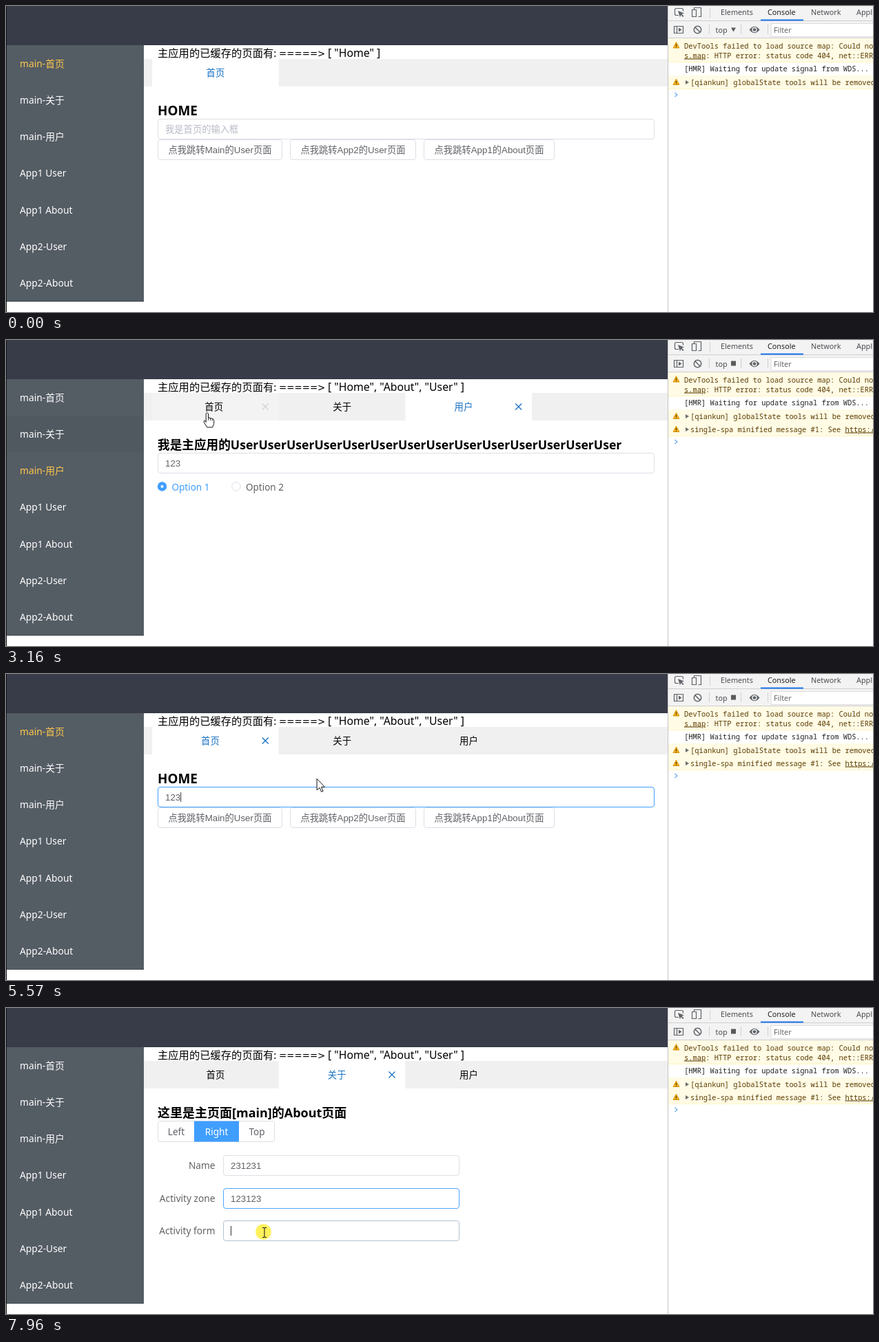
An HTML page that plays this animation: 1258 by 445 pixels, repeating every 8 s.

```html
<!DOCTYPE html>
<html lang="zh-CN">
<head>
<meta charset="utf-8">
<style>
html, body { margin: 0; width: 100%; height: 100%; overflow: hidden; background: #fff; }
svg { display: block; width: 100%; height: 100%; font-family: "Noto Sans", "Noto Sans CJK SC", "Noto Sans CJK", sans-serif; }
.arial { font-family: "Liberation Sans", "Noto Sans CJK SC", "Noto Sans CJK", sans-serif; }
.mono { font-family: "Noto Sans Mono", "DejaVu Sans Mono", monospace; }
.wide { font-family: "DejaVu Sans", sans-serif; }
.bold { font-weight: 700; }
.mid { text-anchor: middle; }
.end { text-anchor: end; }
.link { text-decoration: underline; }
</style>
</head>
<body>
<svg viewBox="0 0 1258 445"><g id="still"></g><g id="live"></g></svg>
<script>
const LOOP = 8000, BLUE = '#409eff', LINK = '#1a72c4', GREY = '#606266';

// Moments at which the screen refreshes: start, end, count.
const bursts = [[530, 920, 6], [1470, 1940, 7], [2400, 3160, 11], [3240, 4040, 11], [4120, 4720, 9],
  [5100, 5880, 11], [5960, 6730, 11], [6810, 7120, 5], [7270, 7960, 10]];
const ticks = [0, 1320, 6030];
for (const [a, b, n] of bursts)
  for (let i = 0; i < n; i++) ticks.push(a + (b - a) * i / (n - 1));
ticks.sort((a, b) => a - b);

// Pointer path: time, x, y.
const path = [[530, 209, 277], [920, 101, 134.5], [1550, 101, 134.5], [1860, 118, 188], [2640, 118, 188],
  [3320, 320, 92], [4120, 320, 92], [4480, 394, 184], [5260, 394, 184], [5400, 410, 216], [5730, 490, 92],
  [6190, 490, 92], [6570, 380, 230], [6890, 380, 230], [7120, 374, 277], [7500, 374, 277],
  [7700, 374, 345], [7880, 375, 326]];
const clicks = [[1320, 1460], [2400, 2470], [3630, 3700], [4490, 4560], [5950, 6000], [6650, 6700],
  [7270, 7340], [7955, 8000]];
const born = [-999, 1450, 2450];
const tabNames = ['首页', '关于', '用户'];
const menu = ['main-首页', 'main-关于', 'main-用户', 'App1 User', 'App1 About', 'App2-User', 'App2-About'];

const clamp = v => Math.max(0, Math.min(1, v));
const between = (v, a, b) => v >= a && v < b;
const mix = (a, b, p) => `color-mix(in srgb, ${b} ${(p * 100).toFixed(1)}%, ${a})`;
// A 300 ms linear transition: the share of the recent past in which the test held.
const ease = (t, test) => {
  let sum = 0;
  for (let k = 0; k < 10; k++) sum += test(t - 30 * k) ? 1 : 0;
  return sum / 10;
};

const rect = (x, y, w, h, fill, more = '') =>
  `<rect x="${x}" y="${y}" width="${w}" height="${h}" style="fill:${fill}" ${more}/>`;
const box = (x, y, w, h, stroke = '#dcdfe6') =>
  `<rect x="${x + .5}" y="${y + .5}" width="${w - 1}" height="${h - 1}" rx="3.5" style="fill:#fff;stroke:${stroke}"/>`;
const text = (x, y, size, fill, s, cls = '') =>
  `<text x="${x}" y="${y}" font-size="${size}" class="${cls}" style="fill:${fill}">${s}</text>`;
const line = (d, stroke, width = 1, more = '') =>
  `<path d="${d}" fill="none" style="stroke:${stroke}" stroke-width="${width}" ${more}/>`;

function pointer(t) {
  if (t < path[0][0]) return { x: -99, y: -99 };
  let i = 0;
  while (i < path.length - 2 && t >= path[i + 1][0]) i++;
  const [t0, x0, y0] = path[i], [t1, x1, y1] = path[i + 1];
  const u = clamp((t - t0) / (t1 - t0)), p = u * u * (3 - 2 * u);
  return { x: x0 + (x1 - x0) * p, y: y0 + (y1 - y0) * p };
}
const page = t => t < 1450 ? 0 : t < 2450 ? 1 : t < 3700 ? 2 : t < 6000 ? 0 : 1;
// The menu loses its selection once the second tab is opened from the tab bar.
const selected = t => t < 6000 ? page(t) : -1;
const focus = t => between(t, 4560, 5960) ? 'home' : between(t, 6700, 7340) ? 'row0'
  : between(t, 7340, 7955) ? 'row1' : t >= 7955 ? 'row2' : '';
const inside = (p, x, y, w, h) => between(p.x, x, x + w) && between(p.y, y, y + h);
const menuTop = i => 57 + 53.25 * i;
const rowTop = i => Math.round(214 + 47.5 * i);
const onMenu = (t, i) => inside(pointer(t), 1, menuTop(i), 199, 53.25);
const onTab = (t, i) => inside(pointer(t), 212 + 183.7 * i, 77, 183.7, 40);
const typed = (t, s, start, step) => s.slice(0, Math.max(0, 1 + Math.floor((t - start) / step)));

function field(t, id, x, y, w, value, hint = '') {
  const over = inside(pointer(t), x, y, w, 30);
  const stroke = mix(over ? '#c0c4cc' : '#dcdfe6', BLUE, ease(t, s => focus(s) === id));
  let out = box(x, y, w, 30, stroke);
  out += value ? text(x + 11, y + 20, 13.3, GREY, value, 'arial') : text(x + 11, y + 20, 13.3, '#b8bcc6', hint, 'arial');
  if (focus(t) === id) out += rect(x + 11 + value.length * 7.4, y + 8, 1, 14, '#333');
  return out;
}

const pages = [
  t => {
    const value = t < 4720 ? '' : t < 5100 ? '1' : t < 5170 ? '12' : '123';
    const button = (x, w, s) => box(x, 194, w, 30) + text(x + w / 2, 214, 13.3, GREY, s, 'arial mid');
    return text(220, 159, 18.9, '#000', 'HOME', 'bold')
      + field(t, 'home', 220, 164, 721, value, '我是首页的输入框')
      + button(220, 181, '点我跳转Main的User页面')
      + button(412, 183, '点我跳转App2的User页面')
      + button(606, 190, '点我跳转App1的About页面');
  },
  t => {
    const values = [typed(t, '231231', 6725, 78), typed(t, '123123', 7420, 76), ''];
    return text(220, 159, 18, '#000', '这里是主页面[main]的About页面', 'bold')
      + box(220, 164, 170, 31) + rect(273, 164.5, 65, 30, BLUE)
      + text(247, 184.5, 13.6, GREY, 'Left', 'mid')
      + text(305.5, 184.5, 13.6, '#fff', 'Right', 'mid')
      + text(364, 184.5, 13.6, GREY, 'Top', 'mid')
      + ['Name', 'Activity zone', 'Activity form'].map((label, i) =>
        text(303.5, rowTop(i) + 20, 13.7, GREY, label, 'end')
        + field(t, 'row' + i, 315, rowTop(i), 343, values[i])).join('');
  },
  t => text(220, 159, 17.65, '#000', '我是主应用的' + 'User'.repeat(14), 'bold')
    + field(t, 'user', 220, 164, 721, '123')
    + `<circle cx="226.5" cy="213" r="6.7" fill="${BLUE}"/><circle cx="226.5" cy="213" r="2" fill="#fff"/>`
    + `<circle cx="334" cy="213" r="6.2" fill="#fff" stroke="#dcdfe6"/>`
    + text(240.5, 218.5, 13.5, BLUE, 'Option 1') + text(348, 218.5, 13.5, GREY, 'Option 2')
];

function tab(t, i) {
  const x = 212 + 183.7 * i;
  const active = t - born[i] < 300 ? 1 : ease(t, s => page(s) === i);
  const hover = ease(t, s => onTab(s, i));
  const cross = i === 0 && t < 2000 ? 0 : Math.max(active, hover);
  const fill = mix(mix('#f0f0f0', '#fafafa', hover), '#fff', active);
  const cx = x + 164.3;
  return rect(x, 77, 183.7, 40, fill)
    + text(x + 92 - 7.5 * cross, 102, 13.4, mix('#000', LINK, active), tabNames[i], 'mid')
    + line(`M${cx - 4.5} 92.5l9 9m0-9l-9 9`, mix('#909399', LINK, active), 1.3, `opacity="${cross}"`);
}

function sidebar(t) {
  return menu.map((name, i) => {
    const active = ease(t, s => selected(s) === i);
    return rect(1, menuTop(i), 199, 53.25, '#434a50', `opacity="${ease(t, s => onMenu(s, i))}"`)
      + text(20, menuTop(i) + 31.5, 13.8, mix('#fff', '#ffc84d', active), name);
  }).join('');
}

const warning = y => `<path d="M972.500 ${y - 4.500}l4.500 8.500h-9z" fill="#f2b01e" stroke="#d99a10" stroke-linejoin="round"/>`
  + line(`M972.500 ${y - 1.500}v3m0 1v1`, '#4a3300', 1.2);
const code = (x, y, s, fill = '#5c3c00') => text(x, y, 10.4, fill, s, 'mono');
const notice = (y, h) => rect(961, y, 297, h, '#fffbe5') + line(`M961 ${y + h - .5}h297`, '#fff5c2');
const foldable = (y, s) => notice(y, 20) + warning(y + 9.5)
  + `<path d="M986 ${y + 7}l5 3-5 3z" fill="#6e6e6e"/>` + code(993, y + 13.5, s);

function consoleTail(t) {
  const late = t >= 2550, y = late ? 148 : 129;
  return (late ? foldable(120, 'single-spa minified message #1: See <tspan class="link">https://single-spa.js.org</tspan>')
    + rect(1052, 30.5, 7, 7, '#5a5a5a') : '<path d="M1052 31.500h7l-3.500 6z" fill="#5a5a5a"/>')
    + line(`M970.500 ${y - 3}l3.500 3-3.500 3`, '#6aa9f0', 1.2);
}

function still() {
  const dark = '#5f6368', tools = (x, s, fill = '#4a4d51') => text(x, 13, 10.8, fill, s);
  return rect(0, 0, 1258, 445, '#fff')
    + rect(0, 0, 960, 57, '#383b48') + rect(0, 0, 1, 445, '#111')
    + rect(1, 57, 199, 373, '#545c64') + rect(1, 429, 199, 1, '#454c53')
    + rect(200, 77, 760, 40, '#f0f0f0')
    + rect(960, 0, 1, 445, '#c4c4c4') + rect(961, 0, 297, 47, '#f3f3f3')
    + line('M961 21.500h297M961 46.500h297M1021.500 3v14M1020.500 27v14M1066.500 27v14M1105.500 27v14', '#cfcfcf')
    + line('M976 13.500h-3.500q-2 0-2-2v-6q0-2 2-2h8q2 0 2 2v2', dark, 1.2)
    + `<path d="M975 7l9 3.500-3.500 1.200 3 3-1.300 1.300-3-3-1.200 3.500z" fill="${dark}"/>`
    + line('M998.500 5v-2.500h10v13h-4M995.500 5.500h6v10h-6z', dark, 1.2)
    + tools(1037, 'Elements') + tools(1105, 'Console', '#222') + tools(1168, 'Network') + tools(1234, 'Application')
    + rect(1095, 19.5, 62, 2, '#1a73e8')
    + line('M969.500 29.500h13v10h-13zM973.500 29.500v10', dark, 1.2)
    + `<path d="M976 31.500l4.500 3-4.500 3z" fill="${dark}"/>`
    + `<circle cx="1003.500" cy="34.500" r="5.200" fill="none" stroke="${dark}" stroke-width="1.500"/>`
    + line('M1000 31l7 7', dark, 1.5)
    + text(1029.5, 38.5, 10.8, '#4a4d51', 'top')
    + `<path d="M1078.500 34.500q7.500-9.500 15 0q-7.500 9.500-15 0z" fill="${dark}"/>`
    + `<circle cx="1086" cy="34.500" r="3" fill="${dark}" stroke="#f3f3f3" stroke-width="1.300"/>`
    + rect(1110, 25, 148, 20, '#fff') + line('M1258 25.500h-148v19h148', '#dcdcdc')
    + text(1114, 39, 10.8, '#666', 'Filter')
    + notice(47, 35) + warning(57)
    + code(984, 62, 'DevTools failed to load source map: Could not load')
    + code(984, 75.5, '<tspan class="link">s.map</tspan>: HTTP error: status code 404, net::ERR_HTTP')
    + code(984, 95, '[HMR] Waiting for update signal from WDS...', '#222')
    + foldable(101, '[qiankun] globalState tools will be removed')
    + text(220, 73.5, 15.3, '#000', '主应用的已缓存的页面有:')
    + text(396, 73.5, 13.4, '#000', '=====&gt;', 'wide');
}

const shapes = {
  hand: '<path d="M-1.500 14V1.500Q0-1 1.800 1.500V7.500L8 9Q10 9.800 10 12V16L8 21.500H0L-4.500 14Q-5 11-2.800 12Z" fill="#fff" stroke="#111" stroke-linejoin="round"/>'
    + line('M1.800 7.500v4M4.800 8.500v3M7.500 9.200v3', '#111', .8),
  arrow: '<path d="M0 0V16.500L4 13L6.500 19L9 18L6.500 12H11.500Z" fill="#fff" stroke="#111"/>',
  beam: line('M-3-6.500h2.200l.8.700.8-.700h2.200M0-6v13M-3 7.500h2.200l.8-.700.8.700h2.200', '#111')
};

function cursor(t) {
  if (t < path[0][0]) return '';
  const p = pointer(t), now = page(t);
  const hot = menu.some((_, i) => onMenu(t, i)) || born.some((b, i) => t >= b && onTab(t, i));
  const entry = now === 1 ? [0, 1, 2].some(i => inside(p, 315, rowTop(i), 343, 30)) : inside(p, 220, 164, 721, 30);
  const glow = clicks.some(([a, b]) => between(t, a, b))
    ? `<circle r="11.300" cx="${p.x - 1.5}" cy="${p.y - .5}" fill="#fff04a" opacity=".9"/>` : '';
  return glow + `<g transform="translate(${p.x} ${p.y})">${shapes[hot ? 'hand' : entry ? 'beam' : 'arrow']}</g>`;
}

function tooltip(t) {
  const shown = Math.min(clamp((t - 3640) / 200), clamp((4350 - t) / 200));
  return shown ? `<g opacity="${shown}">${rect(274, 115, 46, 36, '#303133', 'rx="4"')}${text(297, 137, 11.5, '#fff', '首页', 'mid')}</g>` : '';
}

function draw(t) {
  const open = born.filter(b => t >= b).length;
  const cached = ['Home', 'About', 'User'].slice(0, open).map(s => `"${s}"`).join(', ');
  return sidebar(t) + text(467, 73.5, 15.8, '#000', `[ ${cached} ]`)
    + tabNames.slice(0, open).map((_, i) => tab(t, i)).join('')
    + pages[page(t)](t) + consoleTail(t) + tooltip(t) + cursor(t);
}

const live = document.getElementById('live');
document.getElementById('still').innerHTML = still();
const origin = performance.now();
let last = -1;
function frame() {
  const t = (performance.now() - origin) % LOOP;
  const tick = ticks.filter(v => v <= t).pop();
  if (tick !== last) live.innerHTML = draw(last = tick);
  requestAnimationFrame(frame);
}
frame();
</script>
</body>
</html>
```
